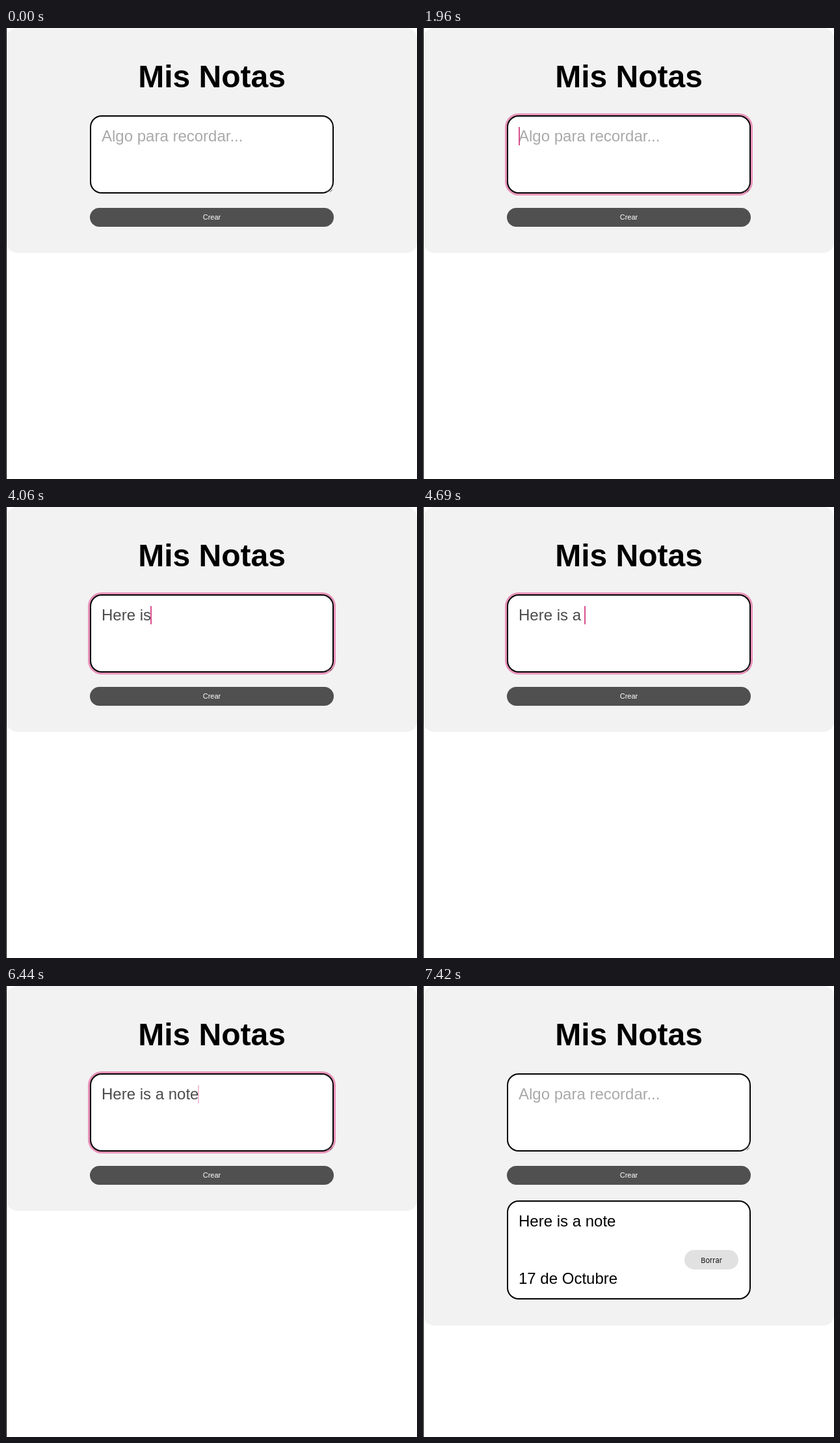
Animation of 632 by 692 pixels, one loop 8000 ms. Source, as an HTML page with a canvas:

```html
<!DOCTYPE html>
<html lang="es">
<head>
<meta charset="utf-8">
<title>Mis Notas</title>
<style>
  html, body { margin: 0; width: 100%; height: 100%; overflow: hidden; background: #fff; }
  canvas { display: block; }
</style>
</head>
<body>
<canvas id="stage" width="632" height="692"></canvas>
<script>
const ctx = document.getElementById('stage').getContext('2d');
const LOOP = 8000;
const STEP = 70;
const SANS = '"Liberation Sans", Arial, sans-serif';
const BODY = '24px ' + SANS;
const NOTE = 'Here is a note';
const FOCUS = 1960, BLUR = 7070, CREATED = 7280;
const KEY_TIMES = [2800, 3150, 3360, 3500, 3640, 3850, 4060, 4200, 4410, 4620, 5040, 5110, 5250, 5320];

function box(x, y, w, h, r, fill) {
  ctx.beginPath();
  ctx.roundRect(x, y, w, h, r);
  ctx.fillStyle = fill;
  ctx.fill();
}

function borderedBox(y, h) {
  box(129, y, 375, h, 18, '#000');
  box(131, y + 2, 371, h - 4, 16, '#fff');
}

function text(str, x, y, font, color, align = 'left') {
  ctx.font = font;
  ctx.fillStyle = color;
  ctx.textAlign = align;
  ctx.fillText(str, x, y);
}

function resizeHandle() {
  ctx.strokeStyle = '#555';
  ctx.lineWidth = 1;
  ctx.beginPath();
  ctx.moveTo(493, 252);
  ctx.lineTo(502, 243);
  ctx.moveTo(498, 252);
  ctx.lineTo(502, 248);
  ctx.stroke();
}

// The caret fades in three even steps.
const fade = (t, start) => Math.max(0, Math.min(3, Math.floor((t - start) / STEP) + 1)) / 3;

function caretAlpha(t) {
  if (t < KEY_TIMES[0]) return 1 - fade(t, 2520);
  return 1 - fade(t, 5950) + fade(t, 6440);
}

function drawCaret(t, typed) {
  ctx.font = BODY;
  const x = Math.max(147, Math.floor(147 + ctx.measureText(typed).width) - 1);
  ctx.globalAlpha = caretAlpha(t);
  ctx.fillStyle = '#d8508f';
  ctx.fillRect(x, 152, 2, 28);
  ctx.globalAlpha = 1;
}

function drawField(t, created) {
  const focused = t >= FOCUS && t < BLUR;
  const count = created ? 0 : KEY_TIMES.filter(time => t >= time).length;
  const typed = NOTE.slice(0, count);
  if (focused) box(126, 131, 381, 126, 21, '#e893b9');
  borderedBox(134, 120);
  resizeHandle();
  if (typed) text(typed, 147, 174, BODY, '#4b4b4b');
  else text('Algo para recordar...', 147, 174, BODY, '#a9a9a9');
  if (focused) drawCaret(t, typed);
}

function drawNote() {
  borderedBox(329, 152);
  text(NOTE, 147, 369, BODY, '#000');
  text('17 de Octubre', 147, 457, BODY, '#000');
  box(402, 405, 83, 30, 15, '#e1e1e1');
  text('Borrar', 443.5, 425, '11px Inter, sans-serif', '#111', 'center');
}

function draw(t) {
  const created = t >= CREATED;
  ctx.fillStyle = '#fff';
  ctx.fillRect(0, 0, 632, 692);
  box(1, 0, 631, created ? 521 : 345, 16, '#f2f2f2');
  ctx.fillStyle = '#000';
  ctx.fillRect(0, 0, 1, 692);

  text('Mis Notas', 316.5, 91, 'bold 48px ' + SANS, '#000', 'center');
  drawField(t, created);
  box(129, 276, 375, 29, 14.5, '#505050');
  text('Crear', 316.5, 294, '11px ' + SANS, '#fff', 'center');
  if (created) drawNote();
}

const start = performance.now();
function tick() {
  draw((performance.now() - start) % LOOP);
  requestAnimationFrame(tick);
}
tick();
</script>
</body>
</html>
```
